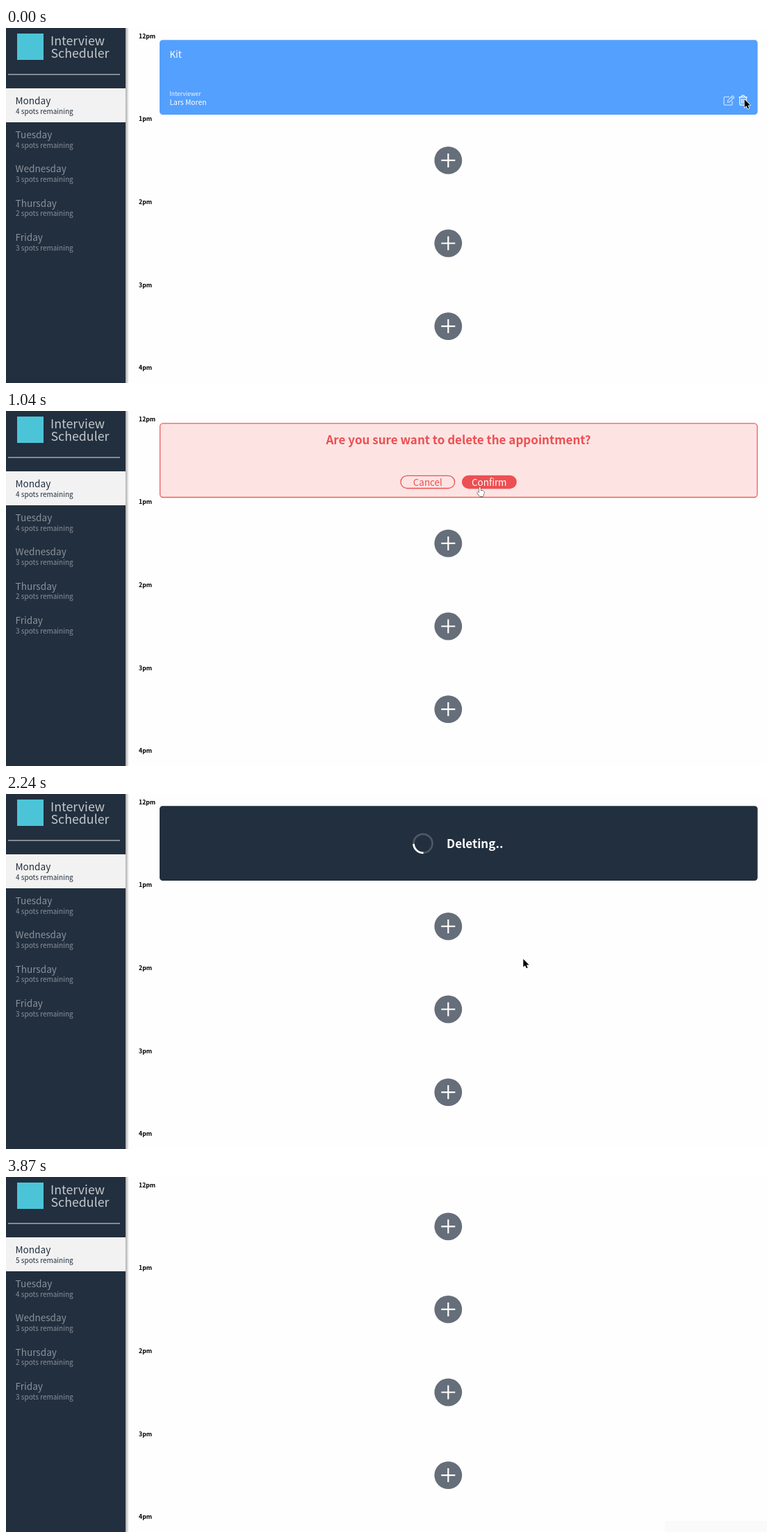
Recreate the animation shown at these times as an HTML page. Size 1095 px wide and 512 px high, loop 4.32 s.

```html
<!DOCTYPE html>
<html lang="en">
<head>
<meta charset="utf-8">
<title>Interview Scheduler</title>
<style>
  html, body { margin: 0; width: 100%; height: 100%; overflow: hidden; background: #fefefe; }
  svg { display: block; width: 1095px; height: 512px; }
  text { font-family: "Noto Sans CJK JP", "Noto Sans CJK SC", "Noto Sans CJK", sans-serif; }
  .light { font-weight: 300; }
  .bold { font-weight: 700; }
  .mid { text-anchor: middle; }
</style>
</head>
<body>
<svg viewBox="0 0 1095 512">
  <defs>
    <linearGradient id="shade">
      <stop offset="0" stop-color="#000" stop-opacity=".32"/>
      <stop offset="1" stop-color="#000" stop-opacity="0"/>
    </linearGradient>
  </defs>

  <rect x="172" width="5" height="512" fill="url(#shade)"/>
  <rect width="172" height="512" fill="#222f3e"/>
  <rect x="16" y="8" width="38" height="38" fill="#4cc4d8"/>
  <g class="light" font-size="17.8" fill="#c3c8cd">
    <text x="64" y="25">Interview</text>
    <text x="64.5" y="42.8">Scheduler</text>
  </g>
  <path d="M3 67H164" stroke="#a3a9b0" stroke-width="1.3"/>
  <rect y="87" width="172" height="49" fill="#f2f2f2"/>
  <g id="days"></g>
  <g id="hours" class="bold" font-size="8.7"></g>
  <g id="slots"></g>

  <g id="booked">
    <rect x="221" y="17.3" width="860.5" height="107.7" rx="4.5" fill="#54a0ff"/>
    <g fill="#fff">
      <text x="235.5" y="42.8" font-size="13.3">Kit</text>
      <text class="light" x="235.3" y="98" font-size="8.5" opacity=".9">Interviewer</text>
      <text x="235.5" y="110.8" font-size="10.3">Lars Moren</text>
    </g>
    <g fill="none" stroke="#fff" stroke-linejoin="round">
      <path d="M1041 99.3H1034.8Q1033 99.3 1033 101V109.4Q1033 111.2 1034.8 111.2H1043Q1044.9 111.2 1044.9 109.4V105.5M1038.3 107.2L1038.8 104.4 1045.4 97.7 1047.8 100.1 1041.1 106.8ZM1043.6 99.5L1046 101.9" stroke-width="1.3" opacity=".65"/>
      <path d="M1054.5 99.6H1066.5M1058 99.4L1059 97.4H1062L1063 99.4M1055.8 100V109.8Q1055.8 111.2 1057.2 111.2H1063.8Q1065.2 111.2 1065.2 109.8V100M1058.4 102V109M1060.5 102V109M1062.6 102V109" stroke-width="1.2"/>
    </g>
  </g>

  <g id="asking" fill="#ed4f52">
    <rect x="221.6" y="17.8" width="859.4" height="106.7" rx="4.5" fill="#fde4e3" stroke="#ed5b5d" stroke-width="1.3"/>
    <text class="bold mid" x="651" y="47.8" font-size="17">Are you sure want to delete the appointment?</text>
    <g stroke="#ed4f52" stroke-width="1.3">
      <rect x="568" y="93.3" width="77.6" height="18.2" rx="9.1" fill="none"/>
      <rect id="confirm" x="656.6" y="93.3" width="77.6" height="18.2" rx="9.1"/>
    </g>
    <text class="mid" x="606.8" y="107.5" font-size="13.4">Cancel</text>
    <text id="confirmText" class="mid" x="695.3" y="107.5" font-size="13.4">Confirm</text>
  </g>

  <g id="deleting">
    <rect x="221" y="17.3" width="860.5" height="107.7" rx="4.5" fill="#222f3e"/>
    <g fill="none" stroke="#fff" stroke-width="2.7">
      <circle cx="600" cy="71.3" r="13.5" opacity=".2"/>
      <path id="arc" d="M613.5 71.3A13.5 13.5 0 0 1 600 84.8"/>
    </g>
    <text class="bold" x="634" y="77.8" font-size="17" fill="#fff">Deleting..</text>
  </g>

  <rect id="corner" x="948" y="496" height="16" fill="#fafafa"/>

  <g stroke-linejoin="round" paint-order="stroke">
    <path id="arrow" d="M0 0V11.6L2.7 9.2 4.5 13.3 6.4 12.5 4.7 8.5H8.3Z" stroke="#fff" stroke-width="1.6" paint-order="stroke"/>
    <path id="hand" d="M3.5 9V1.8A1.2 1.2 0 0 1 5.9 1.8V5.5L9.6 6.3Q11.2 6.7 11 8.3L10.5 11.3 9.5 14H4.6L1.2 9.6Q.6 8.4 1.6 8.1 2.6 7.9 3.5 9ZM5.9 10.5V12.5M8 10.5V12.5" fill="#fff" stroke="#000"/>
  </g>
</svg>
<script>
const LOOP = 4320;
const $ = id => document.getElementById(id);
const show = (id, on) => $(id).style.display = on ? "" : "none";

$("days").innerHTML = ["Monday 4", "Tuesday 4", "Wednesday 3", "Thursday 2", "Friday 3"].map((row, i) => {
  const [day, spots] = row.split(" "), y = 110 + i * 49.2;
  return `<g fill="${i ? "#8a929b" : "#222f3e"}">
    <text x="13.5" y="${y}" font-size="13.6">${day}</text>
    <text class="light" x="14" y="${y + 13.8}" font-size="10"><tspan id="spots${i}">${spots}</tspan> spots remaining</text></g>`;
}).join("");

$("hours").innerHTML = [12, 1, 2, 3, 4].map((h, i) =>
  `<text x="191" y="${14.7 + i * 119.6}">${h}pm</text>`).join("");

$("slots").innerHTML = [0, 1, 2, 3].map(i =>
  `<g id="slot${i}" transform="translate(636.3 ${71.3 + i * 119.6})"><circle r="19.9" fill="#656e79"/>
   <path d="M-10 0H10M0 -10V10" stroke="#fff" stroke-width="2.2"/></g>`).join("");

// The screen refreshes only at these times (ms).
const ticks = [0, 150, 450, 600, 740, 890, 1040, 1340, 1490, 1640, 1790, 1940, 2090, 2240, 2390, 2840, 2980, 3130, 3280, 3730, 3870];

// Pointer stops: time, x, y.
const stops = [
  [0, 1062.7, 103], [450, 784, 124], [600, 688, 118], [740, 679, 112], [890, 677, 111], [1040, 677, 109],
  [1340, 681, 108], [1640, 685, 116], [1790, 742, 232], [1940, 744.3, 238], [2840, 832, 353]
];

function draw() {
  const now = performance.now() % LOOP;
  const t = ticks.findLast(k => k <= now);
  const [, x, y] = stops.findLast(s => s[0] <= t);
  const hover = t >= 890 && t < 1340;

  show("booked", t < 150);
  show("asking", t >= 150 && t < 1340);
  show("deleting", t >= 1340 && t < 2390);
  show("slot0", t >= 2390);
  $("spots0").textContent = t < 2390 ? 4 : 5;

  $("confirm").setAttribute("fill", hover ? "#ed4f52" : "none");
  $("confirmText").setAttribute("fill", hover ? "#fff" : "#ed4f52");
  $("arc").setAttribute("transform", `rotate(${120 + (t - 1340) * 0.364} 600 71.3)`);

  show("hand", hover);
  show("arrow", !hover && t < 2980);
  for (const id of ["hand", "arrow"]) $(id).setAttribute("transform", `translate(${x} ${y})`);

  show("corner", t >= 3130);
  $("corner").setAttribute("width", t < 3280 ? 59 : 147);
  requestAnimationFrame(draw);
}
draw();
</script>
</body>
</html>
```
